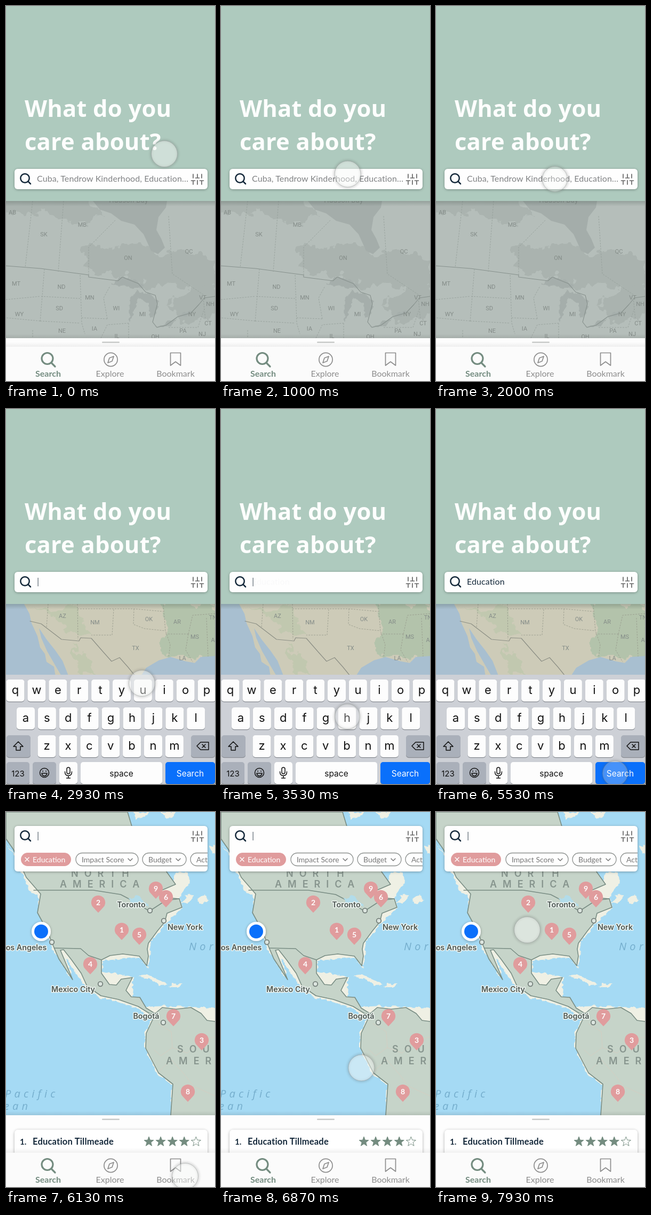
An HTML page for the animation above (8 s loop, 392 by 700 pixels).

```html
<!DOCTYPE html>
<html lang="en">
<head>
<meta charset="utf-8">
<title>Search prototype</title>
<style>
html, body { margin: 0; width: 100%; height: 100%; overflow: hidden; background: #aecabe; }
svg { display: block; width: 100vw; height: 100vh; }
text { font-family: Lato, sans-serif; }
.mid { text-anchor: middle; }
.title { font: 700 43.5px "Open Sans", sans-serif; letter-spacing: .2px; fill: #fdfefd; }
.field { font-size: 16px; letter-spacing: .1px; }
.key { font: 22px Inter, sans-serif; text-anchor: middle; fill: #111; }
.small { font-size: 16px; }
.state { font: 11px Roboto, sans-serif; text-anchor: middle; fill: #848c88; }
.city { font: 600 14.3px Inter, sans-serif; text-anchor: middle; fill: #4d5753; stroke: #eef4f0; stroke-width: 3px; paint-order: stroke; stroke-linejoin: round; }
.land { font: 600 18px Inter, sans-serif; fill: #87958e; letter-spacing: 11px; }
.sea { font: italic 20px "Open Sans", sans-serif; fill: #75aecd; letter-spacing: 6.2px; }
.pin { font-size: 14px; font-weight: 700; text-anchor: middle; fill: #fff; }
.chip { font-size: 14px; fill: #777; }
.line { fill: none; stroke-linecap: round; stroke-linejoin: round; }
.dash { fill: none; stroke-dasharray: 3 2; stroke-width: .8; }
</style>
</head>
<body>
<svg viewBox="0 0 392 700" preserveAspectRatio="none">
  <defs>
    <filter id="soft" x="-20%" y="-30%" width="140%" height="170%">
      <feDropShadow dx="0" dy="1" stdDeviation="2.5" flood-opacity=".32"/>
    </filter>
    <filter id="blur" x="-20%" y="-20%" width="140%" height="140%"><feGaussianBlur stdDeviation="2"/></filter>
    <filter id="ragged">
      <feTurbulence type="fractalNoise" baseFrequency=".05" numOctaves="3" seed="4"/>
      <feDisplacementMap in="SourceGraphic" scale="34" xChannelSelector="R" yChannelSelector="G"/>
    </filter>
    <filter id="coast">
      <feTurbulence type="fractalNoise" baseFrequency=".12" numOctaves="2" seed="7"/>
      <feDisplacementMap in="SourceGraphic" scale="9" xChannelSelector="R" yChannelSelector="G"/>
    </filter>
    <linearGradient id="fall" x2="0" y2="1">
      <stop stop-color="#4b5c55" stop-opacity=".3"/><stop offset="1" stop-color="#4b5c55" stop-opacity="0"/>
    </linearGradient>
    <linearGradient id="rise" x2="0" y2="1">
      <stop stop-color="#333" stop-opacity="0"/><stop offset="1" stop-color="#333" stop-opacity=".12"/>
    </linearGradient>
    <clipPath id="cardClip"><rect id="clipBox" x="16" y="0" width="362" height="38" rx="6"/></clipPath>
  </defs>

  <g id="north">
    <rect y="364" width="392" height="272" fill="#b5beba"/>
    <g fill="#aab3af" filter="url(#ragged)">
      <path d="M140 455 170 442 205 454 250 440 285 466 330 455 392 470V520L350 530 310 515 270 528 225 503 175 500 150 490Z"/>
      <path d="M-10 350H150L185 392 150 405 110 400 70 385 30 392-10 380ZM300 560 345 530 400 515V580L340 590Z"/>
    </g>
    <path fill="#a4adaa" d="M163 364 176 380 197 387 216 401 241 408 258 426 264 439 272 457 285 463 298 451 291 434 282 418 286 394 300 376 302 364Z"/>
    <path fill="#a5aeab" filter="url(#coast)" d="M198 520 217 506 244 511 257 524 238 528 216 521ZM232 548 244 532 270 538 285 550 282 575 270 582 268 555 247 545 239 575 231 590ZM279 600 303 590 321 583 307 597ZM325 576 347 569 348 577 326 580Z"/>
    <path class="line" stroke="#87918d" stroke-width="1.1" d="M0 485 65 490 155 502V506L178 509 210 513 218 506 248 518 262 534 280 540 284 556 275 590 283 600 300 596 322 580 347 573 362 557 372 545 392 542"/>
    <path class="dash" stroke="#949d99" d="M50 364 36 488M108 364 98 496M205 400 155 450V502M72 491 64 590M66 542 139 546M64 588 139 592M139 502 142 592 148 612M64 588 0 582M0 548 64 542M142 582 190 584M190 584 183 545 195 523M178 620 190 595 230 592M230 592V620M305 392 312 500 372 540M305 600H360L372 565M370 545 374 585M50 605V620"/>
  </g>
  <g id="south">
    <rect y="364" width="392" height="140" fill="#cdcbb8"/>
    <g filter="url(#ragged)">
      <path fill="#b3c3ab" d="M290 364H400V462L340 465 295 460 286 435 308 415Z"/>
      <path fill="#c1c8af" d="M45 366 75 374 125 370 160 420 130 425 95 390ZM120 440 155 470 170 496H140Z"/>
    </g>
    <path fill="#a8bfd0" d="M0 364H34L44 382 48 400 59 424 64 445 73 457 76 472 90 481 93 500H0ZM62 409 76 430 92 450 106 470 118 500H105L92 478 77 452 66 427ZM252 500 263 483 287 469 309 463 337 471 354 474 365 463 392 461V500Z"/>
    <path class="line" stroke="#8c8f85" stroke-width="1.2" d="M45 396 66 401 104 430 137 433 140 427 160 428 181 452 198 471 213 464 229 482 242 498"/>
    <path class="dash" stroke="#96988b" d="M79 364 76 408M134 364 135 430M134 373H240L295 378M202 374 199 422H160M240 373 239 402 260 410 299 414M295 366 299 414 308 440 305 464M299 420H342M342 420 337 450 350 472M342 420 350 385 392 382M376 390 379 462"/>
  </g>
  <g id="atlas">
    <rect width="392" height="700" fill="#a5daf4"/>
    <g filter="url(#coast)" fill="#eff0e4">
      <path d="M0 58 18 80 30 112 45 150 61 155 60 143ZM318 111 340 113 347 130 330 150 326 160 312 140ZM330 170 343 152 352 157 340 172ZM356 161 373 154 381 166 364 171ZM247 306 263 303 286 313 306 322 288 323 267 311ZM311 320 333 321 327 327 307 327ZM380 64 400 90V60ZM237 0 246 14 262 8 270 0ZM290 0 302 13 316 6 320 0Z"/>
      <path d="M64 190 90 255 100 270 122 308 104 257 150 325 178 345 211 352 248 365 266 378 284 372 262 414 263 442 286 488 313 508 310 580H392V368L293 364 263 366 235 345 237 309 180 300 179 276 250 269 265 287 270 242 300 205 330 178 318 135 60 143Z" stroke="#eff0e4" stroke-width="4"/>
    </g>
    <g fill="#c6d4c9" stroke="#798d84" stroke-width="1.6" stroke-linejoin="round">
      <path d="M0 0H228L237 30 300 110 318 135 283 150 300 160 325 162 330 178 302 189 298 205 284 222 267 245 265 256 267 269 264 287 250 269 219 265 195 268 179 276 179 301 194 322 207 323 216 312 237 309 225 333 235 345 251 346 263 366 284 379 269 376 248 363 211 350 178 343 152 325 141 301 123 276 108 257 102 258 125 313 99 274 90 253 76 219 59 188 65 153 38 122 14 70 0 50Z"/>
      <path d="M263 413 281 375 293 365 319 368 347 365 366 376 377 389 400 392V580H308L313 508 286 487 262 441Z"/>
    </g>
    <path class="line" stroke="#798d84" stroke-width="1.5" d="M52 146H164L215 154 238 166 269 185 300 165 325 162M91 254 140 255 155 268 179 276"/>
    <path class="line" stroke="#d3cec2" d="M285 395 310 410 312 440 290 455 278 444M312 440 340 450 365 425 392 420M287 484 310 462 335 490 352 512 340 545M352 512 392 530"/>
    <path fill="#b2dcea" filter="url(#coast)" d="M229 163 249 155 259 168 270 176 249 177Z"/>
  </g>

  <g id="sheet">
    <rect y="-8" width="392" height="8" fill="url(#rise)"/>
    <rect width="392" height="150" fill="#fdfdfd"/>
    <rect x="180" y="6.5" width="33" height="2.6" rx="1.3" fill="#c9cbca"/>
    <g id="result">
      <rect x="16" y="27" width="362" height="80" rx="7" fill="#fff" filter="url(#soft)"/>
      <text x="26" y="55" font-size="15" font-weight="700" fill="#14283a">1.</text>
      <text x="50" y="55" font-size="16.5" font-weight="700" fill="#14283a" letter-spacing=".2">Education Tillmeade</text>
    </g>
  </g>
  <g id="panel">
    <rect y="364" width="392" height="10" fill="url(#fall)"/>
    <rect width="392" height="364" fill="#aecabe"/>
    <text class="title" x="35" y="207">What do you</text>
    <text class="title" x="35" y="269">care about?</text>
  </g>
  <g id="tabs">
    <rect y="627" width="392" height="9" fill="url(#rise)" opacity=".6"/>
    <rect y="636" width="392" height="64" fill="#fbfbfb"/>
    <g class="line" stroke="#8d8d8d" stroke-width="1.7">
      <g stroke="#748c80" stroke-width="3.2"><circle cx="77.5" cy="658" r="10.5"/><path d="M85 666 92 673"/></g>
      <circle cx="196.500" cy="660" r="12.6"/><path d="M202 654 199 663 191 666 194 657Z"/>
      <path d="M308.500 647.500H327.500V671L318 664 308.500 671Z"/>
    </g>
    <g class="small mid">
      <text x="79" y="692" font-weight="700" fill="#748c80">Search</text>
      <text x="195" y="692" fill="#8d8d8d">Explore</text>
      <text x="318" y="692" fill="#8d8d8d">Bookmark</text>
    </g>
  </g>

  <g id="card">
    <rect id="cardBox" x="16" width="362" height="38" rx="6" fill="#fefefe" filter="url(#soft)"/>
    <g class="line" stroke="#14283a" stroke-width="2.5"><circle cx="35.500" cy="17.500" r="8.2"/><path d="M41.500 23.500 46 28"/></g>
    <path class="line" stroke="#666" stroke-width="1.7" d="M351 10V17M347.500 22H354.500M351 22V29M359 10V17M355.500 17H362.500M359 21.500V29M367 10V17M363.500 22H370.500M367 22V29"/>
    <text id="hint" class="field" x="58" y="24" fill="#808284">Cuba, Tendrow Kinderhood, Education…</text>
    <text id="query" class="field" x="58" y="24" fill="#14283a">Education</text>
    <rect id="caret" x="59.500" y="11" width="1.2" height="16" fill="#596570"/>
    <g id="chips" clip-path="url(#cardClip)"></g>
  </g>
  <g id="keyboard"><rect y="496" width="392" height="204" fill="#cdd0d6"/></g>
  <g id="touch">
    <circle r="25" fill="none" stroke="#555" stroke-width="2.5" opacity=".35" filter="url(#blur)"/>
    <circle id="dot" r="24.5" fill="#f6f8f6" stroke="#8d9491" stroke-opacity=".5"/>
  </g>
</svg>
<script>
const $ = id => document.getElementById(id);
const add = (id, markup) => $(id).insertAdjacentHTML('beforeend', markup);
const label = (cls, text, x, y, extra = '') => `<text class="${cls}" x="${x}" y="${y}" ${extra}>${text}</text>`;

// "name x y" entries, with _ standing for a space
const labels = (cls, list, dy) => list.split(',').map(item => {
  const [name, x, y] = item.trim().split(' ');
  return label(cls, name.replace('_', ' '), x, +y + dy);
}).join('');

add('north', labels('state', 'AB 12 385,MB 143 408,SK 71 426,ON 229 470,QC 343 458,MT 19 518,ND 104 524,MN 157 544,SD 100 564,WY 25 575,WI 207 564,MI 256 575,NY 349 575,VT 369 544,NH 383 556,CT 379 592,NE 105 606,IA 166 602,IL 208 616,OH 280 617,PA 332 606,NJ 368 612', 4)
  + label('state', 'Hudson Bay', 230, 367, 'style="font-size:13px;letter-spacing:.4px"'));
add('south', labels('state', 'AZ 106 386,NM 167 398,OK 268 392,AR 321 397,MS 354 425,TX 243 446,LA 331 465,TN 388 389,AL 391 431', 4));

const ring = ([x, y]) => `<circle cx="${x}" cy="${y}" r="4.3" fill="#dce5df" stroke="#75807b" stroke-width="1.8"/>`;
const pin = ([x, y], n) => `<path d="M${x - 11.5} ${y + 6.5}A13.200 13.200 0 1 1 ${x + 11.5} ${y + 6.5}Q${x + 6} ${y + 13} ${x} ${y + 19}Q${x - 6} ${y + 13} ${x - 11.5} ${y + 6.5}Z" fill="#e09c9d"/>`
  + label('pin', n + 1, x, y + 5);
const pins = [[217, 220], [173, 169], [367, 426], [158, 284], [250, 229], [300, 159], [314, 381], [341, 522], [281, 143]];
add('atlas', labels('land', 'NORTH 122 115,AMERICA 101 135,SOUTH 321 443,AMERICA 300 465', 6)
  + label('sea', 'Nor', 343, 258) + label('sea', 'Pacific', -2, 533) + label('sea', 'ean', -4, 556)
  + labels('city', 'Toronto 235 173,New_York 336 215,Los_Angeles 34 253,Mexico_City 126 331,Bogotá 263 381', 5)
  + [[270, 184], [296, 203], [86, 243], [177, 321], [295, 393]].map(ring).join('')
  + pins.map(pin).join('')
  + '<circle cx="66" cy="223" r="18" fill="#fff" filter="url(#soft)"/><circle cx="66" cy="223" r="13" fill="#0a70fb"/>');

const star = (cx, filled) => {
  const points = Array.from({ length: 10 }, (_, i) => {
    const r = i % 2 ? 4 : 9.5, a = i * Math.PI / 5;
    return `${(cx + r * Math.sin(a)).toFixed(1)},${(49.5 - r * Math.cos(a)).toFixed(1)}`;
  }).join(' ');
  return `<polygon points="${points}" fill="${filled ? '#748c80' : 'none'}" stroke="#748c80" stroke-width="1" stroke-linejoin="round"/>`;
};
add('result', [0, 1, 2, 3, 4].map(i => star(268 + i * 22.1, i < 4)).join(''));

const chip = (x, w, text, arrow) => `<rect x="${x}" y="50.500" width="${w}" height="24" rx="12" fill="none" stroke="#8b8f8d" stroke-width="1.300"/>`
  + label('chip', text, x + 11, 67.5)
  + (arrow ? `<path class="line" stroke="#777" stroke-width="1.5" d="M${x + w - 19} 61l4 4 4-4"/>` : '');
add('chips', '<rect x="28" y="50" width="94" height="25" rx="12.500" fill="#e09c9d"/><path class="line" stroke="#fff" stroke-width="1.400" d="M36 59l7 7m0-7l-7 7"/>'
  + label('chip', 'Education', 50, 67.5, 'style="fill:#fff"')
  + chip(131, 117, 'Impact Score', true) + chip(256, 82, 'Budget', true) + chip(346, 90, 'Act'));

const key = (x, y, w, text = '', fill = '#fdfdfd', style = '') =>
  `<rect x="${x}" y="${y + 1.3}" width="${w}" height="41" rx="5" fill="#888c92"/><rect x="${x}" y="${y}" width="${w}" height="41" rx="5" fill="${fill}"/>`
  + label('key', text, x + w / 2, y + 27, `style="${style}"`);
const row = (letters, x, y) => [...letters].map((c, i) => key(x + i * 39.9, y, 34, c)).join('');
const gray = '#aab0ba';
add('keyboard', row('qwertyuiop', 0.5, 505) + row('asdfghjkl', 20, 557) + row('zxcvbnm', 59.5, 609)
  + key(1, 609, 45, '', gray) + key(347, 609, 45, '', gray)
  + key(1, 659, 43, '123', gray, 'font-size:15px') + key(50, 659, 44, '', gray) + key(100, 659, 34)
  + key(140, 659, 153, 'space', '#fdfdfd', 'font-size:15.5px') + key(299, 659, 93, 'Search', '#0a70fb', 'font-size:15.5px;fill:#fff')
  + `<g class="line" stroke="#111" stroke-width="1.500">
    <path d="M23 621 32 630H27V637H19V630H14Z"/>
    <path d="M358 629 365 622H380V636H365ZM368 626l6 6m0-6l-6 6"/>
    <circle cx="72" cy="679" r="8.500"/><path d="M67 680H77Q76 685 72 685T67 680M69 675.500v1M75 675.500v1"/>
    <rect x="114" y="669" width="6" height="12" rx="3"/><path d="M110.500 677Q110.500 684.500 117 684.500T123.500 677M117 685V689M113.500 689H120.500"/></g>`);

const ease = p => p < 0 ? 0 : p > 1 ? 1 : p * p * (3 - 2 * p);
const ramp = (t, from, to) => ease((t - from) / (to - from));
const path = [[0, 297, 276], [1400, 223, 323], [2300, 223, 323], [2930, 255, 512], [3000, 255, 512],
  [3450, 237, 574], [4400, 237, 574], [5250, 336, 680], [6250, 336, 680], [7600, 171, 220]];
const taps = [2050, 3500, 5530];

function touchAt(t) {
  let i = 1;
  while (i < path.length - 1 && t > path[i][0]) i++;
  const [t0, x0, y0] = path[i - 1], [t1, x1, y1] = path[i], p = ramp(t, t0, t1);
  return [x0 + (x1 - x0) * p, y0 + (y1 - y0) * p];
}
const show = (id, value) => $(id).setAttribute('opacity', value);
const shift = (id, y) => $(id).setAttribute('transform', `translate(0 ${y})`);

function draw() {
  const t = performance.now() % 8000;
  const typing = ramp(t, 2200, 2550);
  const results = ramp(t, 5620, 6020);
  const query = ramp(t, 3520, 3650);
  const press = Math.max(...taps.map(at => 1 - Math.min(1, Math.abs(t - at) / 150)));
  const height = 38 + 47 * results;

  show('south', typing);
  show('atlas', results);
  show('result', results);
  show('hint', 1 - typing);
  show('query', query * (1 - results));
  show('caret', Math.max(typing * (1 - query), results));
  show('chips', results);
  shift('panel', -376 * results);
  shift('sheet', 620 - 54 * results);
  shift('keyboard', 206 * (1 - typing + results));
  shift('card', 304 - 278 * results);
  $('cardBox').setAttribute('height', height);
  $('clipBox').setAttribute('height', height);

  const [x, y] = touchAt(t);
  $('touch').setAttribute('transform', `translate(${x} ${y}) scale(${1 - .05 * press})`);
  $('dot').setAttribute('fill-opacity', .45 - .2 * press);
  requestAnimationFrame(draw);
}
draw();
</script>
</body>
</html>
```
